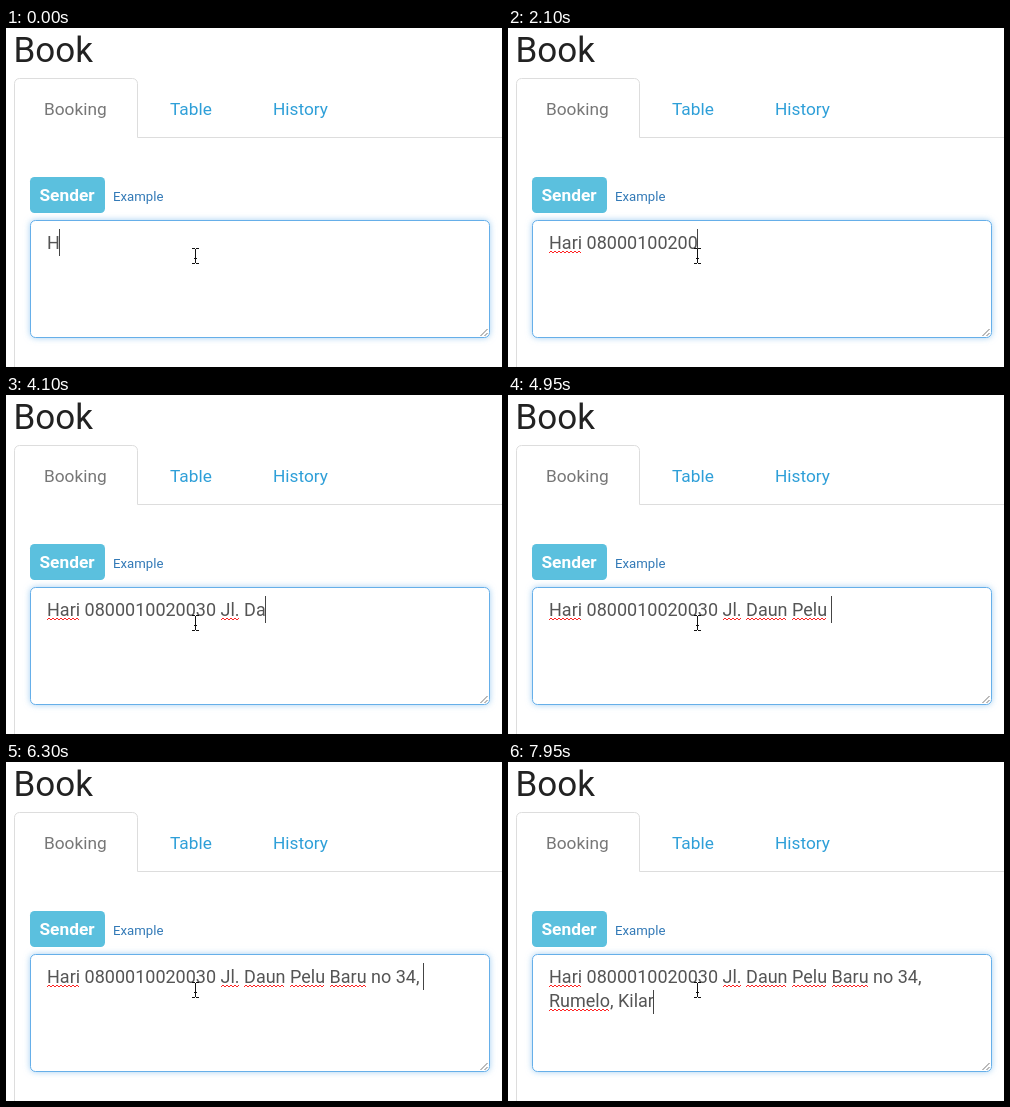
These frames come from a looping animation (496 by 339 pixels, 8000 ms). An HTML page:

```html
<!DOCTYPE html>
<html lang="en">
<head>
<meta charset="utf-8">
<title>Booking form</title>
<style>
  html, body { margin: 0; width: 100%; height: 100%; overflow: hidden; background: #fff; }
  svg { display: block; font: 17.3px Roboto, sans-serif; }
  path { fill: none; }
  .link { fill: #2e9fd8; }
  .box { fill: #fff; stroke: #66afe9; filter: drop-shadow(0 0 3px rgba(102, 175, 233, .6)); }
  .typed { font-size: 18px; fill: #555; white-space: pre; }
  .crisp { shape-rendering: crispEdges; }
</style>
</head>
<body>
<svg width="496" height="339" viewBox="0 0 496 339">
  <text x="7.5" y="34" font-size="35" fill="#222">Book</text>
  <path d="M8.5 339V55.5a5 5 0 0 1 5-5h113a5 5 0 0 1 5 5v54H496" stroke="#ddd"/>
  <text x="38" y="87" fill="#777">Booking</text>
  <text x="164" y="87" class="link">Table</text>
  <text x="267" y="87" class="link">History</text>

  <rect x="24" y="149" width="75" height="36" rx="4.5" fill="#5bc0de"/>
  <text x="33.5" y="173" font-weight="700" fill="#fff">Sender</text>
  <text x="107" y="173" font-size="13.2" fill="#337ab7">Example</text>

  <rect x="24.5" y="192.5" width="459" height="117" rx="5" class="box"/>
  <path d="M474.5 308l7-7m-3 7l3-3" stroke="#777"/>

  <text x="41" y="221" class="typed"></text>
  <text x="41" y="245" class="typed"></text>
  <path id="squiggles" stroke="#f22"/>
  <rect id="caret" width="1" fill="#444" class="crisp"/>
  <path d="M186 220.5h3m1 0h3M189.5 221v14M186 235.5h3m1 0h3M188 230.5h3" stroke="#111" class="crisp"/>
</svg>
<script>
const LOOP = 8000, LEFT = 41;
const FIRST = 'Hari 0800010020030 Jl. Daun Pelu Baru no 34, ';
const MESSAGE = FIRST + 'Rumelo, Kilar';
const WRAP_AT = FIRST.length + 5; // the last word moves down once it no longer fits

// Bursts of typing: first key, last key, number of keys
const keyTimes = [
  [200, 1150, 8], [1250, 1350, 2], [1500, 2250, 6], [2450, 2450, 1], [2850, 2850, 1],
  [3150, 3150, 1], [3300, 3700, 4], [4050, 4950, 9], [5050, 5050, 1], [5200, 5750, 8],
  [6050, 6300, 3], [6450, 6750, 5], [7250, 7950, 8]
].flatMap(([from, to, n]) => Array.from({ length: n }, (_, i) =>
  Math.round((from + (to - from) * i / Math.max(1, n - 1)) / 50) * 50));
const caretOff = [[2750, 2850], [7100, 7250]];

const lines = document.querySelectorAll('.typed');
const squiggles = document.getElementById('squiggles');
const caret = document.getElementById('caret');

const widthOf = (line, n) => n ? line.getSubStringLength(0, n) : 0;

function zigzag(x1, x2, y) {
  let d = `M${x1} ${y + 2}`;
  for (let x = x1 + 2, up = true; x <= x2; x += 2, up = !up) d += `L${x} ${up ? y : y + 2}`;
  return d;
}

// Finished capitalised words get a spelling mark
function marks(line, y) {
  return [...line.textContent.matchAll(/[A-Z][a-z.]+(?=[ ,])/g)].map(({ 0: word, index }) =>
    zigzag(Math.round(LEFT + widthOf(line, index)),
           LEFT + widthOf(line, index + word.length), y)).join('');
}

function draw(t) {
  const typed = 1 + keyTimes.filter(k => k <= t).length;
  const wrapped = typed >= WRAP_AT;
  const split = wrapped ? FIRST.length : typed;
  lines[0].textContent = MESSAGE.slice(0, split);
  lines[1].textContent = MESSAGE.slice(split, typed);
  squiggles.setAttribute('d', marks(lines[0], 223) + marks(lines[1], 247));

  const current = lines[+wrapped];
  caret.setAttribute('x', Math.floor(LEFT + widthOf(current, typed - (wrapped ? split : 0))));
  caret.setAttribute('y', wrapped ? 228 : 201);
  caret.setAttribute('height', wrapped ? 24 : 27);
  caret.style.display = caretOff.some(([a, b]) => t >= a && t < b) ? 'none' : '';
}

const start = performance.now();
function tick() {
  draw((performance.now() - start) % LOOP);
  requestAnimationFrame(tick);
}
tick();
</script>
</body>
</html>
```
